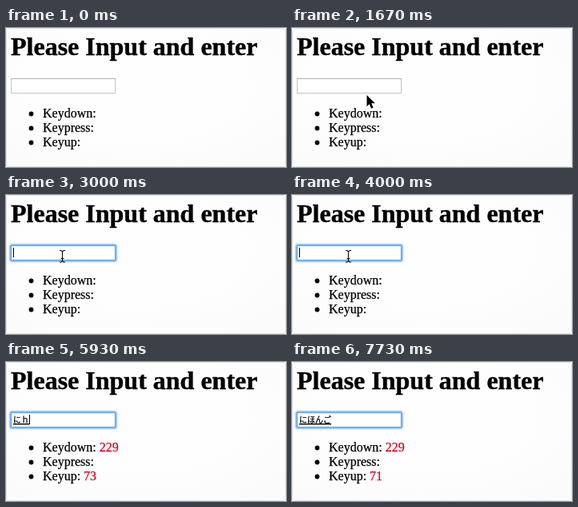
An HTML page for the animation above (8 s loop, 350 by 174 pixels).

```html
<!DOCTYPE html>
<html lang="en">
<head>
<meta charset="utf-8">
<title>Key codes</title>
<style>
  html, body { margin: 0; width: 100%; height: 100%; overflow: hidden; background: #fff; }
  svg { display: block; width: 350px; height: 174px; }
  text {
    font: 16px "Liberation Serif", "Times New Roman", serif;
    font-kerning: none; white-space: pre;
    stroke: #000; stroke-width: .25px;
  }
  .title { font-size: 32px; font-weight: bold; stroke-width: .4px; }
  .code { fill: #d0021b; stroke: #d0021b; }
  #typed { font: 500 10px "Noto Sans CJK JP", "Noto Sans CJK", sans-serif; }
  #ring rect { fill: none; stroke: #4a9bf0; }
</style>
</head>
<body>
<svg viewBox="0 0 350 174">
  <defs>
    <radialGradient id="page" cx=".46" cy=".4" r=".75">
      <stop offset=".5" stop-color="#fefefe"/>
      <stop offset="1" stop-color="#fbfbfb"/>
    </radialGradient>
  </defs>
  <rect x=".5" y=".5" width="349" height="173" rx="3" fill="url(#page)" stroke="#e2e2e2"/>

  <text class="title" x="6" y="34">Please Input and enter</text>

  <rect id="field" x="6.5" y="63.5" width="130" height="18" fill="#fff" stroke="#c4c4c4"/>
  <path id="bevel" d="M6 63.5H137" stroke="#b0b0b0"/>
  <g id="ring">
    <rect x="3.5" y="60.5" width="136" height="24" rx="3" opacity=".12"/>
    <rect x="4.5" y="61.5" width="134" height="22" rx="2.5" opacity=".45"/>
    <rect x="5.5" y="62.5" width="132" height="20" rx="1.5" opacity=".75"/>
    <rect x="6.5" y="63.5" width="130" height="18" opacity=".6"/>
    <rect x="7.5" y="64.5" width="128" height="16" opacity=".15"/>
  </g>
  <text id="typed" x="9" y="76"></text>
  <rect id="underline" x="9" y="77" height="1.4"/>
  <rect id="caret" y="66" width="1" height="12"/>

  <circle cx="31.5" cy="107.5" r="2.9"/>
  <circle cx="31.5" cy="125.5" r="2.9"/>
  <circle cx="31.5" cy="143.5" r="2.9"/>
  <text x="46" y="112">Keydown: <tspan id="down" class="code"></tspan></text>
  <text x="46" y="130">Keypress:</text>
  <text x="46" y="148">Keyup: <tspan id="up" class="code"></tspan></text>

  <path id="arrow" d="M.5 0V14.2L3.7 11.2L6 16.8L8.6 15.7L6.3 10.3H10.8Z"
        stroke="#fff" stroke-width="1.4" paint-order="stroke" stroke-linejoin="round"/>
  <path id="beam" d="M67 69.5H69L70.5 71L72 69.5H74M70.5 71V82.5M67 84H69L70.5 82.5L72 84H74M68.5 79.5H72.5"
        fill="none" stroke="#111" stroke-width="1.2"/>
</svg>
<script>
const LOOP = 8000, FOCUS = 2870, TYPING = 5670, CARET_ON = 530, BLINK = 1000, ADVANCE = 10;
const $ = id => document.getElementById(id);

// Pointer tip: [time, x, y]
const pointer = [
  [1330, 192, 71], [1400, 110, 88], [1600, 102, 87], [1670, 93, 84],
  [1730, 85, 81], [1800, 77, 78], [1870, 72, 76], [2000, 69, 75]
];
const compositions = [
  [5670, 'ｎ'], [5800, 'に'], [5930, 'にｈ'], [6070, 'にほ'],
  [6330, 'にほｎ'], [6470, 'にほん'], [7070, 'にほんｇ'], [7200, 'にほんご']
];
const keyups = [
  [5730, 78], [5870, 73], [6000, 72], [6200, 79],
  [6400, 78], [7270, 79], [7400, 71]
];

const latest = (steps, t) => steps.filter(step => step[0] <= t).pop();
const show = (id, on) => { $(id).style.display = on ? '' : 'none'; };

function draw(t) {
  const focused = t >= FOCUS;
  const tip = latest(pointer, t);
  const [editTime, text] = latest(compositions, t) || [FOCUS, ''];
  const keyup = latest(keyups, t);
  const width = text.length * ADVANCE;

  show('ring', focused);
  show('bevel', !focused);
  show('arrow', tip && !focused);
  if (tip) $('arrow').setAttribute('transform', `translate(${tip[1]} ${tip[2]})`);
  show('beam', focused && t < TYPING);

  // Every edit restarts the blink.
  show('caret', focused && (t - editTime) % BLINK < CARET_ON);
  $('caret').setAttribute('x', 9 + width);
  $('underline').setAttribute('width', width);
  $('typed').textContent = text;
  $('down').textContent = t >= TYPING ? '229' : '';
  $('up').textContent = keyup ? keyup[1] : '';
}

const start = performance.now();
function tick() {
  draw((performance.now() - start) % LOOP);
  requestAnimationFrame(tick);
}
tick();
</script>
</body>
</html>
```
